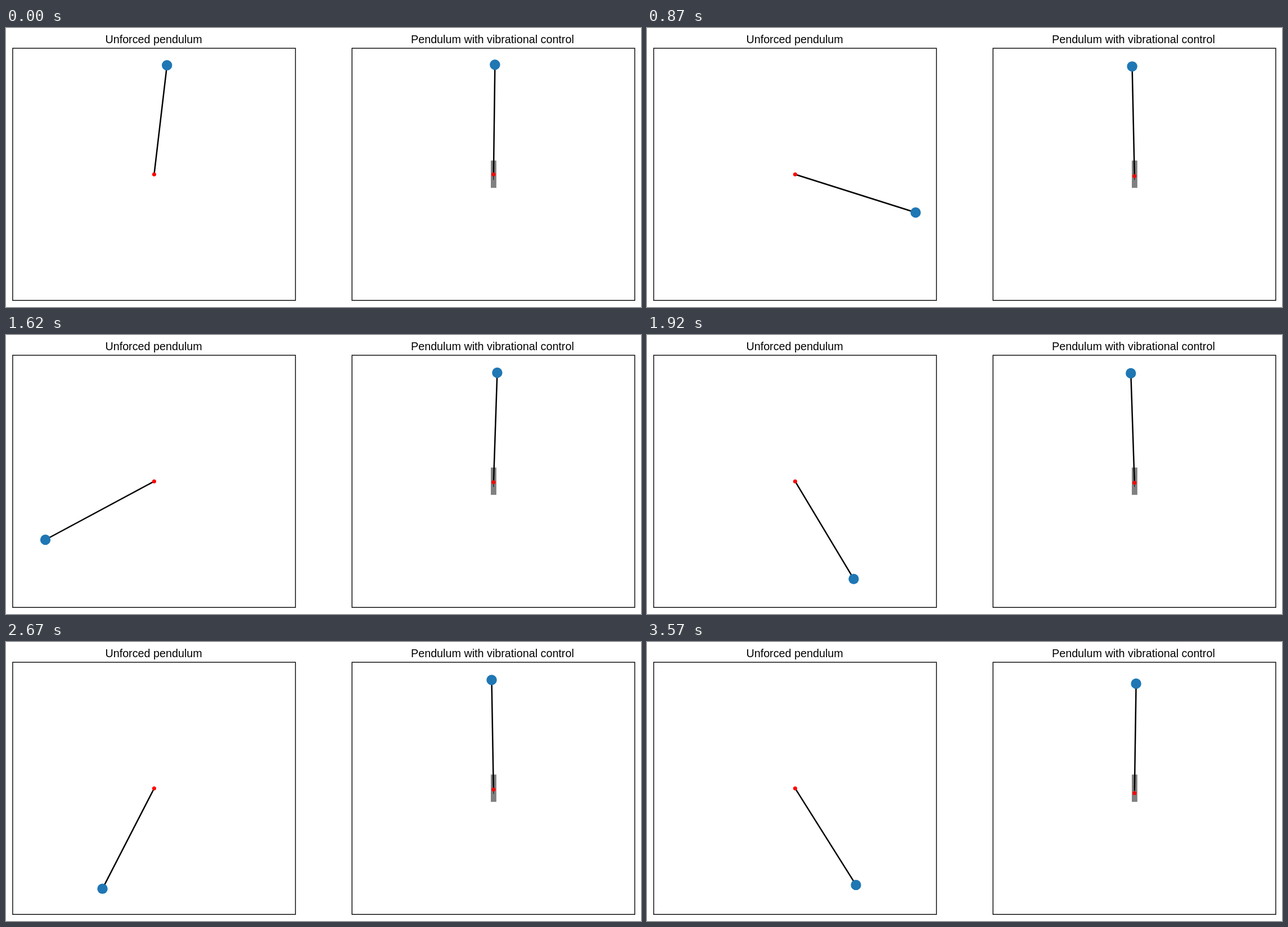
Write an HTML page that moves like this. It is 1129 px wide and 496 px high and loops after 3.6 s.

```html
<!DOCTYPE html>
<html lang="en">
<meta charset="utf-8">
<title>Pendulum with vibrational control</title>
<style>
  html, body { margin: 0; width: 100%; height: 100%; overflow: hidden; background: #fff; }
  svg { display: block; }
  text { font: 19.75px "Liberation Sans", Arial, sans-serif; text-anchor: middle; }
  .axes { fill: none; stroke: #000; stroke-width: 1.4; }
  .rod { stroke: #000; stroke-width: 2.5; }
  .bob { fill: #1f77b4; }
  .pivot { fill: red; }
</style>
<svg width="1129" height="496" viewBox="0 0 1129 496">
  <text x="262.6" y="27">Unforced pendulum</text>
  <text x="864.9" y="27">Pendulum with vibrational control</text>
  <rect class="axes" x="11.9" y="36" width="502.7" height="448.3"/>
  <rect class="axes" x="615.2" y="36" width="502.7" height="448.3"/>
  <rect x="862" y="235.6" width="9.8" height="48.6" fill="#808080"/>
  <path d="M866.8 250.4V270" stroke="#000"/>
  <g id="free"><line class="rod"/><circle class="bob" r="9.2"/><circle class="pivot" r="3.5"/></g>
  <g id="driven"><line class="rod"/><circle class="bob" r="9.2"/><circle class="pivot" r="3.5"/></g>
</svg>
<script>
const STEP = 0.03, FRAMES = 120, MID = 260.2;
const LX = 228.5, LY = 194.9;          // rod length along each axis
const GRAVITY = 21.7, DAMPING = 0.975; // unforced pendulum
const LIFT = 0.05, SHAKE = 2.1557;     // pivot amplitude, phase per frame

// Unforced angle from upright: semi-implicit midpoint integration
const angles = [];
let angle = 0.1, speed = 0;
const accel = (a, v) => GRAVITY * Math.sin(a) - DAMPING * v;
for (let n = 0; n < FRAMES; n++) {
  angles.push(angle);
  for (let i = 0, h = STEP / 60; i < 60; i++) {
    const a = angle + speed * h / 2, v = speed + accel(angle, speed) * h / 2;
    angle += v * h;
    speed += accel(a, v) * h;
  }
}

function set(node, attrs) {
  for (const key in attrs) node.setAttribute(key, attrs[key]);
}

function pose(id, x, pivotY, rodY, theta) {
  const [rod, bob, pivot] = document.getElementById(id).children;
  const bx = x + LX * Math.sin(theta), by = pivotY - LY * Math.cos(theta);
  set(rod, { x1: x, y1: rodY, x2: bx, y2: by });
  set(bob, { cx: bx, cy: by });
  set(pivot, { cx: x, cy: pivotY });
}

function draw(now) {
  const n = Math.floor(now / 1000 / STEP) % FRAMES, t = n * STEP;
  const lift = LIFT * Math.sin(SHAKE * n);
  const sway = 0.035 * Math.exp(-0.025 * t) * Math.sin(10.535 * t + 2.82) * (1 + lift);
  pose("free", 263.4, MID, MID, angles[n]);
  pose("driven", 866.8, MID - lift * LY, 264, sway);
  requestAnimationFrame(draw);
}
draw(performance.now());
</script>
</html>
```
